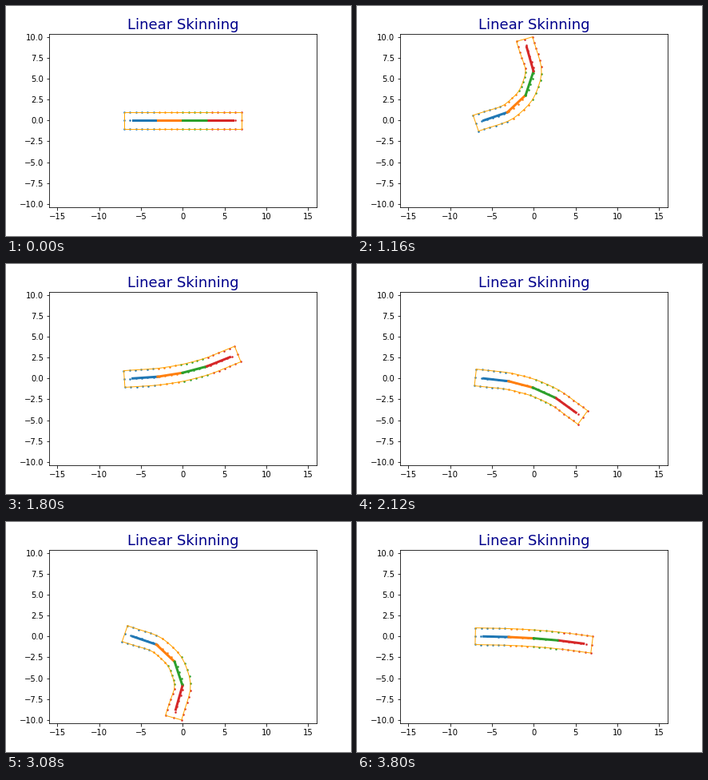
A matplotlib script for the animation above (3.84 s loop, 432x288 px).

```python
import numpy as np
import matplotlib.pyplot as plt
from matplotlib.animation import FuncAnimation

FRAMES, INTERVAL = 96, 40
COLORS = ["#1f77b4", "#ff7f0e", "#2ca02c", "#d62728"]
BONE = 3.0
SWING = np.pi / np.array([9, 7, 6, 5])     # peak bend of each joint
REST = -6 + BONE * np.arange(4)            # rest position of each bone's root

# Skin: three rows of 21 vertices around the chain
cols = np.linspace(-7, 7, 21)
skin = np.array([[x, y] for y in (1, 0, -1) for x in cols])

# Smooth falloff around each bone's centre
gap = skin[:, :1] - (REST + BONE / 2)
weights = np.exp(-0.5 * (gap / 1.5) ** 2)
weights /= weights.sum(axis=1, keepdims=True)
owner = np.clip(((skin[:, 0] + 6) // BONE).astype(int), 0, 3)

top, mid, bottom = np.arange(63).reshape(3, 21)
border = np.concatenate([top, mid[-1:], bottom[::-1], mid[:1], top[:1]])


def pose(frame):
    """Joint positions and blended skin vertices for one frame."""
    angles = np.cumsum(SWING * np.sin(2 * np.pi * frame / FRAMES))
    joints = [np.array([-6.0, 0.0])]
    blended = np.zeros_like(skin)
    for k, a in enumerate(angles):
        rot = np.array([[np.cos(a), -np.sin(a)], [np.sin(a), np.cos(a)]])
        moved = (skin - [REST[k], 0]) @ rot.T + joints[-1]
        blended += weights[:, k:k + 1] * moved
        joints.append(joints[-1] + BONE * rot[:, 0])
    return np.array(joints), blended


fig = plt.figure(figsize=(6, 4), dpi=72, facecolor="white")
ax = fig.add_axes([0.125, 0.125, 0.775, 0.755])
half_height = 16 * 217.44 / 334.8
ax.set_xlim(-16, 16)
ax.set_ylim(-half_height, half_height)
ax.set_xticks(np.arange(-15, 16, 5))
ax.set_yticks(np.arange(-10, 10.1, 2.5))
ax.set_title("Linear Skinning", fontsize=18, color="darkblue")

bones = [ax.plot([], [], color=c, lw=3, zorder=2)[0] for c in COLORS]
dots = [ax.plot([], [], "o", color=c, ms=2, mew=0.5, zorder=3)[0] for c in COLORS]
outline, = ax.plot([], [], color="orange", lw=1, zorder=4)


def update(frame):
    joints, verts = pose(frame)
    for k in range(4):
        bones[k].set_data(joints[k:k + 2, 0], joints[k:k + 2, 1])
        own = verts[owner == k]
        dots[k].set_data(own[:, 0], own[:, 1])
    outline.set_data(verts[border, 0], verts[border, 1])
    return [*bones, *dots, outline]


anim = FuncAnimation(fig, update, frames=FRAMES, interval=INTERVAL,
                     repeat=True, repeat_delay=0, blit=False)
plt.show()
```
